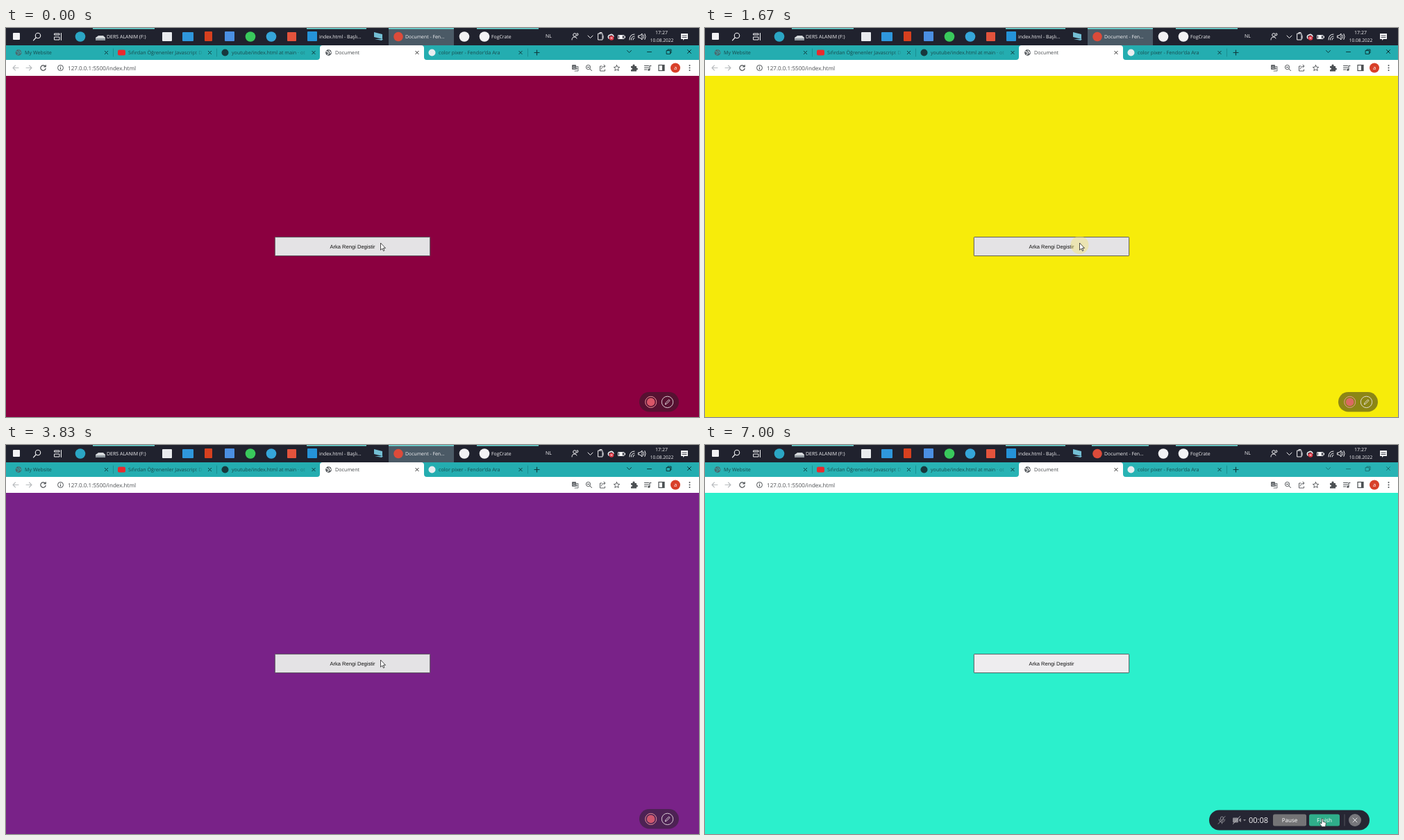
An HTML page for the animation above (7170 ms loop, 998 px wide and 561 px high).

```html
<!DOCTYPE html>
<html lang="tr">
<head>
<meta charset="utf-8">
<title>Arka Rengi Degistir</title>
<style>
  html, body { margin: 0; width: 100%; height: 100%; overflow: hidden; }
  svg { display: block; width: 100%; height: 100%; }
  text { font-family: "Open Sans", "Noto Sans", sans-serif; text-rendering: geometricPrecision; }
  .line { fill: none; stroke-width: 1; stroke-linecap: round; stroke-linejoin: round; }
</style>
</head>
<body>
<svg id="stage" viewBox="0 0 998 561" preserveAspectRatio="none"></svg>
<script>
const stage = document.getElementById('stage');
const LOOP = 7170, EXPAND = 5170;

const rect = (x, y, w, h, fill, r = 0, extra = '') =>
  `<rect x="${x}" y="${y}" width="${w}" height="${h}" rx="${r}" fill="${fill}" ${extra}/>`;
const circle = (x, y, r, fill, extra = '') => `<circle cx="${x}" cy="${y}" r="${r}" fill="${fill}" ${extra}/>`;
const line = (d, color, width = 1) => `<path class="line" d="${d}" stroke="${color}" style="stroke-width:${width}"/>`;
const text = (x, y, size, fill, str, extra = '') =>
  `<text x="${x}" y="${y}" font-size="${size}" fill="${fill}" ${extra}>${str}</text>`;
const cross = (x, y, r, color, w = 1) =>
  line(`M${x - r} ${y - r}l${2 * r} ${2 * r}M${x + r} ${y - r}l${-2 * r} ${2 * r}`, color, w);
const globe = (x, y, fill, mark) => circle(x, y, 4.4, fill) +
  line(`M${x - 3} ${y - 1.6}l2 .6 1 1.6-1 2.4M${x + .6} ${y - 3.4}l.4 1.8 2.4 1.2-1.6 1.6`, mark, 1.1);

function taskbar() {
  const w = '#f2f2f4', under = '#6fe0dc';
  const squares = [[10, 7, 10, 10, w], [225, 6, 14, 13, '#e9ebee'], [254, 6, 16, 13, '#2f97dc'],
    [286, 5, 11, 14, '#d6401f'], [315, 5, 14, 14, '#4b8fe2'], [405, 6, 13, 13, '#e3533c'], [434, 5, 14, 14, '#2593d8']];
  const circles = [[107, '#2ba6c4'], [352, '#39c95c'], [382, '#35a6da'], [660, w], [689, w]];
  return rect(0, 0, 998, 25, '#20222e') +
    rect(551, 0, 94, 25, '#4b5a66', 0, 'id="activeTask"') +
    [[125, 89], [433, 86], [678, 89]].map(([x, n]) => rect(x, 0, n, 1.5, under)).join('') +
    rect(551, 0, 94, 1.5, under, 0, 'id="activeLine"') +
    squares.map(([x, y, a, b, c]) => rect(x, y, a, b, c, 1)).join('') +
    circles.map(([x, c]) => circle(x, 12.5, 7.3, c)).join('') + circle(565, 12.5, 6.8, '#dc4b3a') +
    circle(46, 11, 3.7, 'none', `stroke="${w}" stroke-width="1.1"`) + line('M43 14l-3.5 3.8', w, 1.2) +
    line('M70 8h7v2h-7zM70 13h7v4h-7zM79.500 7.500v10', w) +
    '<path d="M129 14l4-3h7l3 3v4h-14z" fill="#d5d9dc"/><path d="M129 15h14v3h-14z" fill="#8f989f"/>' +
    '<path d="M530 6l12 3v7l-12-3zM531 16l10 2 2-2" fill="#74bfd4"/>' +
    text(145, 15, 7, w, 'DERS ALANIM (F:)') + text(451, 15, 6.9, w, 'index.html - Başlı...') +
    text(575, 15, 6.9, w, 'Document - Fen...') + text(699, 15, 6.9, w, 'FogCrate') +
    text(777, 14, 7, w, 'NL') +
    circle(819, 10, 2.3, 'none', `stroke="${w}"`) + line('M815 17q0-4 4-4 2.500 0 3 2M822 8q2-1 2 1t-2 2', w) +
    line('M838 11l3.500 3.500 3.500-3.500', w) +
    line('M853 8h6v9h-6zM855 8v-1.500h3M860 11v4', w) +
    line('M868 15q-2-4 2-5 3-2 5 2', w, 1.6) + circle(872, 14.500, 3.3, '#de3341') + cross(872, 14.5, 1.1, '#fff', .8) +
    line('M882 10.500h8v5h-8zM891.500 12v2', w) + rect(883, 11, 5, 4, w) +
    line('M898 17q0-8 7-8M900.500 17q0-5 4.500-5M903 17q0-2.500 2-2.500', w) +
    line('M911 11h2l3-3v9l-3-3h-2zM918 10q1.500 2.500 0 5M920 8.500q2.500 4 0 8', w) +
    text(944, 9, 7, w, '17:27', 'text-anchor="middle"') + text(944.5, 20, 6.6, w, '10.08.2022', 'text-anchor="middle"') +
    '<path d="M972 8h10v8h-5l-2 2v-2h-3z" fill="#f2f2f4"/>' + line('M974 11h6M974 13.500h6', '#20222e', .8);
}

function browser() {
  const dark = '#17484b', ink = '#4c5053', size = 7.2;
  return rect(0, 25, 998, 21, '#24adb0', 0, 'id="strip"') +
    '<path d="M448 46q4 0 4-4V29q0-4 4-4h142q4 0 4 4v13q0 4 4 4z" fill="#fff"/>' +
    line('M154.500 30v11M303.500 30v11M751.500 30v11', '#17888b', .8) +
    globe(18, 35.5, '#496b70', '#39a5a9') + globe(464.5, 35.5, '#5b5f63', '#fff') +
    rect(161, 31.5, 11, 8, '#e92a2d', 2) + circle(315.5, 35.5, 5, '#17383d') + circle(613.5, 35.5, 5, '#e9edf0') +
    text(27, 38, size, dark, 'My Website') +
    text(176, 38, size, 'url(#fadeA)', 'Sıfırdan Öğrenenler Javascript D') +
    text(325, 38, size, 'url(#fadeB)', 'youtube/index.html at main · ot') +
    text(474, 38, size, '#45494c', 'Document') + text(623, 38, size, dark, "color pixer - Fendor'da Ara") +
    [144.5, 293.5, 443, 741].map(x => cross(x, 35.5, 2.2, '#103b3e')).join('') + cross(592, 35.5, 2.2, '#333') +
    line('M761 35.500h7M764.500 32v7', '#103b3e', 1.2) +
    `<g id="controls">${line('M894.500 32.500l3 3 3-3M923.500 34.500h6M951.500 32.500h5v5h-5zM953 32.500v-1.500h5v5h-1.500', '#0b2e30', .9)}${cross(984, 34, 2.5, '#0b2e30')}</g>` +
    rect(0, 46, 998, 23, '#fff') +
    line('M18 57.500h-8M13.500 54l-3.500 3.500 3.500 3.500M29 57.500h8M33.500 54l3.500 3.500-3.500 3.500', '#b9bcbf', 1.1) +
    line('M56.600 55.500a3.700 3.700 0 1 0 .5 3M57.200 53.500v2.500h-2.500', ink, 1.2) +
    circle(78.5, 57.5, 4, 'none', `stroke="${ink}"`) + line('M78.500 57v2.500M78.500 55.200v.1', ink) +
    text(89, 60.5, 8.1, '#4a4d50', '127.0.0.1:5500/index.html') +
    rect(815, 53, 6, 7, '#65696d', 1) + line('M820 55.500h4v6.500h-5M821 58h2M822 57v3', '#65696d', .9) +
    text(816.2, 58.5, 5, '#fff', 'G') +
    circle(838.5, 56.5, 3.1, 'none', `stroke="${ink}"`) + line('M841 59l2.500 2.700M837.300 56.500h2.500', ink) +
    line('M858 55h-2.500v7h7v-2M857.500 59q.500-4 5-4M861 53l2 2-2 2', ink, .9) +
    line('M879.500 53.500l1.200 2.700 3 .3-2.200 2 .7 3-2.700-1.600-2.700 1.600.7-3-2.200-2 3-.3z', ink, .9) +
    '<path d="M900 55h2.500q-.5-2.500 1.500-2.500t1.500 2.500h2.500v2.500q2 0 2 1.500t-2 1.500v2h-8v-2.500q2 0 2-1.300t-2-1.200z" fill="#4c5053"/>' +
    line('M919.500 54.500h6M919.500 57.200h6M919.500 60h3.500M927 60v-5.500h2', ink, 1.1) + circle(925.800, 60.3, 1.5, ink) +
    rect(940, 53.5, 8, 8, 'none', 0, `stroke="${ink}" stroke-width="1.2"`) + rect(945, 54, 3, 7, ink) +
    circle(964, 57.5, 7, '#d8402a') + text(964, 60, 7.5, '#fff', 'a', 'text-anchor="middle"') +
    [54, 57.5, 61].map(y => circle(984.5, y, 1, ink)).join('');
}

function recorder() {
  const soft = '#f0e8ea', dim = '#8c8c93';
  return `<g id="small">${rect(912, 525, 57, 28.5, '#232323', 14.2, 'fill-opacity=".5"')}
    <g id="pulse">${circle(928.7, 539.4, 5.8, '#f0384f')}${circle(928.7, 539.4, 8, 'none', 'stroke="#f2707a"')}</g>
    ${circle(928.7, 539.4, 8, 'none', 'stroke="#e8c8c8" stroke-opacity=".4"')}
    ${circle(928.7, 539.4, 5.8, '#e8c8c8', 'fill-opacity=".25"')}
    ${circle(952.5, 539.4, 8.2, 'none', `stroke="${soft}" stroke-opacity=".85"`)}
    ${line('M949.500 542.500l.6-2 4.500-4.500 1.400 1.400-4.500 4.500z', soft, .9)}</g>
  <g id="large">${rect(726, 526.5, 231, 29, '#262633', 14.5)}
    ${rect(742.5, 536, 4, 6, 'none', 2, `stroke="${dim}"`)}${line('M740.500 540q0 4 4 4t4-4M744.500 544v2M749 535.500l-10 11', dim)}
    ${rect(760, 537.500, 8, 7, dim, 1)}<path d="M769 540l3-2v6l-3-2zM775 540h4l-2 2.500z" fill="${dim}"/>${line('M770.500 535.500l-10 11', '#b0b0b4')}
    ${text(783, 545, 11, '#f4f4f6', '00:08', 'id="clock"')}
    ${rect(818, 532.5, 48, 17, '#747476', 2.5)}${text(842, 544, 8.1, '#fff', 'Pause', 'text-anchor="middle"')}
    ${rect(870, 532.5, 44, 17, '#2fae8a', 2.5)}${text(892, 544, 8.1, '#fff', 'Finish', 'text-anchor="middle"')}
    ${rect(920.5, 532.5, 1, 17, '#55555f')}${circle(936, 541, 9, '#77777c')}${cross(936, 541, 3, '#e0e0e2')}</g>`;
}

const fade = (id, x) => `<linearGradient id="${id}" gradientUnits="userSpaceOnUse" x1="${x}" x2="${x + 18}">
  <stop stop-color="#17484b"/><stop offset="1" stop-color="#17484b" stop-opacity="0"/></linearGradient>`;

stage.innerHTML = `<defs>${fade('fadeA', 268)}${fade('fadeB', 418)}</defs>` +
  rect(0, 69, 998, 492, '#8b0040', 0, 'id="page"') + taskbar() + browser() +
  rect(387.3, 301.6, 223.4, 27, '#e4e3e5', .8, 'id="button" stroke="#4f4d52" stroke-width=".9"') +
  text(499, 318, 7.57, '#111', 'Arka Rengi Degistir',
    'text-anchor="middle" style="font-family:\'Liberation Sans\',Arial,sans-serif"') +
  circle(539.5, 313, 13, '#f5e66a', 'id="halo"') + recorder() +
  `<g id="pointer">
    <path id="arrow" d="M0 0v10.200l2.400-2.200 1.600 3.500 1.500-.7-1.600-3.400h3.100z" fill="#fff" stroke="#222" stroke-width=".8"/>
    <path id="hand" d="M-1 1q0-1.500 1-1.500t1 1.500v3.300l3.500 1q1 .4.800 1.700l-.8 4.500h-5l-3-4q-.8-1.500 1-1.300l1.500 1z" fill="#fff" stroke="#222" stroke-width=".7"/>
  </g>`;

const el = id => document.getElementById(id);
const set = (id, attrs) => { for (const k in attrs) el(id).setAttribute(k, attrs[k]); };
const show = (id, on) => { el(id).style.display = on ? '' : 'none'; };

// [time, page colour]
const colors = [[0, '#8b0040'], [670, '#afffad'], [1670, '#f7ec0a'], [2670, '#858b78'],
  [3330, '#792288'], [4000, '#2fe8cb'], [4670, '#2bf0cc']];
const clicks = colors.slice(1, 6).map(c => c[0]);
// [time, x, y]
const path = [[0, 539.5, 310], [4170, 539.5, 310], [4500, 763.5, 425.5], [5000, 938, 536],
  [5300, 938, 536], [6200, 889, 539], [LOOP, 889, 539]];

function pointerAt(t) {
  const i = path.findIndex((p, n) => n && t <= p[0]);
  const [a, b] = [path[i - 1], path[i]], k = (t - a[0]) / (b[0] - a[0]);
  return [a[1] + (b[1] - a[1]) * k, a[2] + (b[2] - a[2]) * k];
}

function draw(now) {
  const t = now % LOOP, open = t >= EXPAND;
  const [x, y] = pointerAt(t);
  const hover = x < 611 && y < 329;
  const click = clicks.filter(c => c <= t).pop() ?? -1e4;

  set('page', { fill: colors.filter(c => c[0] <= t).pop()[1] });
  set('button', { fill: hover ? '#e4e3e5' : '#eeedef' });
  set('halo', { 'fill-opacity': Math.max(0, .4 * (1 - (t - click) / 450)) });
  set('pointer', { transform: `translate(${x} ${y})` });
  show('arrow', !open);
  show('hand', open);

  show('small', !open);
  show('large', open);
  set('pulse', { opacity: .45 - .4 * Math.cos(2 * Math.PI * (t - 1000) / 1750) });
  el('clock').textContent = '00:0' + Math.floor(t / 1000 + 1.3);

  // The browser window loses focus while the recorder panel is open.
  show('activeTask', !open);
  set('activeLine', open ? { x: 557, width: 82 } : { x: 551, width: 94 });
  set('strip', { fill: open ? '#28b3b4' : '#24adb0' });
  set('controls', { opacity: open ? .5 : 1 });
}

const start = performance.now();
function frame() {
  draw(performance.now() - start);
  requestAnimationFrame(frame);
}
frame();
</script>
</body>
</html>
```
